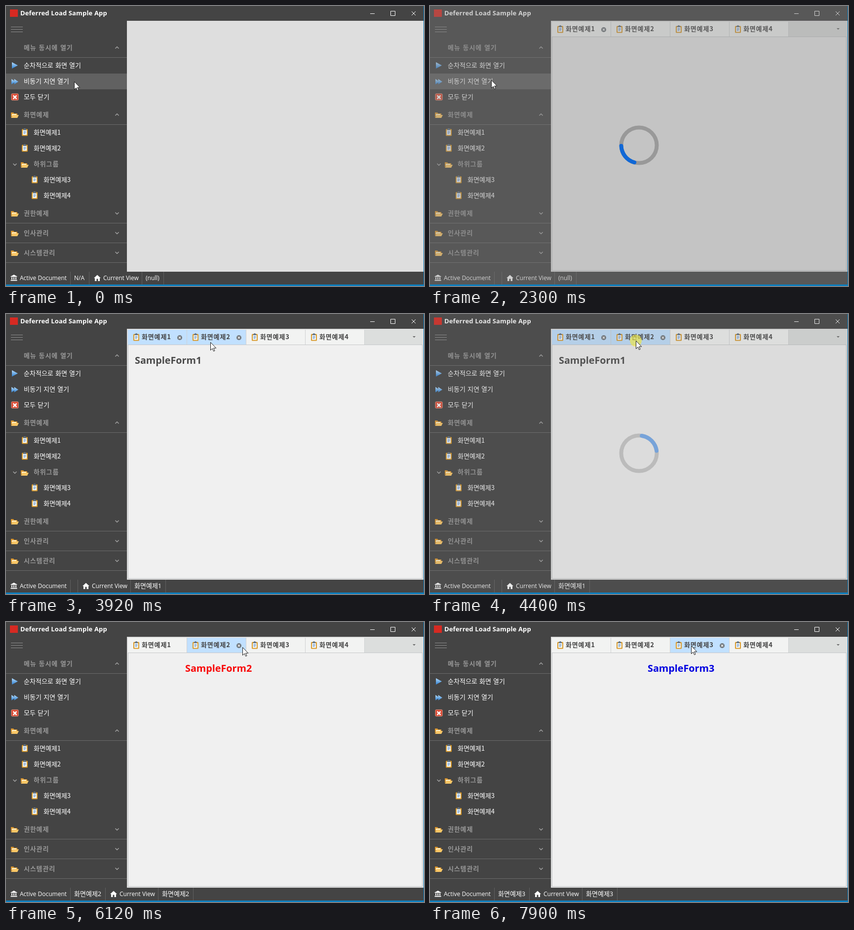
These frames come from a looping animation (847x568 px, 8000 ms). An HTML page:

```html
<!DOCTYPE html>
<html lang="ko">
<head>
<meta charset="utf-8">
<title>Deferred Load Sample App</title>
<style>
  html, body { margin: 0; width: 100%; height: 100%; overflow: hidden; background: #444; }
  svg { display: block; }
  text { font: 13px "Noto Sans CJK KR", "Noto Sans CJK", sans-serif; fill: #fff; word-spacing: .5px; white-space: pre; }
  .group { font-weight: 700; fill: #979797; letter-spacing: .85px; }
  .tab { font-weight: 700; fill: #444; letter-spacing: .85px; }
  .title { font: 700 13px "Noto Sans", sans-serif; letter-spacing: .15px; word-spacing: 0; }
  .status { font: 12px "Open Sans", "Noto Sans CJK KR", "Noto Sans CJK", sans-serif; word-spacing: 0; }
  .status.ko { font-size: 13px; }
  .form { font: 700 19.8px "Open Sans", sans-serif; word-spacing: 0; }
  .line { fill: none; stroke: #a8a8a8; stroke-width: 1.4; }
</style>
</head>
<body>
<svg id="app" width="847" height="568" viewBox="0 0 847 568">
  <defs>
    <linearGradient id="blue" x2="0" y2="1">
      <stop stop-color="#b5dcfb"/><stop offset="1" stop-color="#2f7fd0"/>
    </linearGradient>
    <g id="folder">
      <path d="M0 2h5l1.500 2H13v3H3L0 13z" fill="#d9962f"/>
      <path d="M2 5h9v4H2z" fill="#fff3d0"/>
      <path d="M3.500 7H16l-3 6H.5z" fill="#fbc766"/>
    </g>
    <g id="clip">
      <rect x="1" y="1.500" width="12" height="14" rx="1.500" fill="#d99a2b"/>
      <path d="M3 4h8v9.500H3z" fill="#f4f9ff"/>
      <path d="M4.500 6.500h5M4.500 8.500h5M4.500 10.500h4" stroke="#5688c4"/>
      <path d="M4 1.500h1.500L6 0h2l.5 1.500H10V4H4z" fill="#5f7389"/>
    </g>
    <path id="play" d="M0 0L12 6.500L0 13z" fill="url(#blue)"/>
    <g id="cross">
      <circle r="5" fill="#70767c"/>
      <path d="M-2-2L2 2M2-2L-2 2" stroke="#eee" stroke-width="1.500"/>
    </g>
  </defs>
  <rect width="847" height="568" fill="#444"/>
  <rect id="hover" width="245" height="32" fill="#616161"/>
  <g id="chrome"></g>
  <g id="side"></g>
  <rect x="245" y="30" width="601" height="509" fill="#dedede"/>
  <g id="docs">
    <rect x="247" y="32" width="597" height="31" fill="#dcdedd"/>
    <rect id="page" x="247.500" y="62.500" width="596" height="474" stroke="#c6c8ca"/>
    <g id="tabs"></g>
    <path d="M824 45h6l-3 3z" fill="#666"/>
    <text id="form" class="form" y="101"></text>
  </g>
  <g id="status"></g>
  <rect id="shade" width="846" height="565" fill="#7c7c7c"/>
  <g id="ring" fill="none" stroke-width="8">
    <circle cx="423.500" cy="282.500" r="36" stroke="#979797"/>
    <path id="arc" stroke="#0864d7" stroke-linecap="round"/>
  </g>
  <path d="M846 0h1v568H0v-3h846z" fill="#0d7fbf"/>
  <circle id="press" r="12" fill="#f0e63c" fill-opacity=".62"/>
  <path id="mouse" d="M.5.5V16.500L4.200 13L6.700 18.500L9 17.500L6.600 12.200H11.700z" fill="#fff" stroke="#1c1c1c"/>
</svg>
<script>
const LOOP = 8000, STEP = 75;
const $ = id => document.getElementById(id);
const clamp = v => Math.min(1, Math.max(0, v));
const text = (x, y, s, cls = '') => `<text x="${x}" y="${y}" class="${cls}">${s}</text>`;
const use = (id, x, y) => `<use href="#${id}" x="${x}" y="${y}"/>`;
const rule = y => `<path d="M0 ${y}.5H245" stroke="#6a6a6a"/>`;
const chevron = (x, y, d) => `<path class="line" d="M${x - 3.5} ${y - d * 1.75}l3.5 ${d * 3.5}l3.5 ${-d * 3.5}"/>`;
const docName = n => '화면예제' + n;

// Pointer moves: begin, end, destination
const REST = [138, 153];
const MOVES = [
  [659, 660, 124, 150], [2860, 3210, 184, 138], [3210, 3690, 356, 82], [3690, 3920, 414, 57],
  [4000, 4080, 417, 54], [4400, 5420, 426, 54], [5500, 5580, 431, 53], [5740, 6510, 529, 48]
];

// Each load: click, start of the fade-out
const LOADS = [[1290, 2300], [4400, 5340], [6830, 7670]];

const STATES = [
  { at: 0, tab: 0, form: 0, doc: 'N/A', view: '(null)' },
  { at: 2140, tab: 1, form: 0, doc: '', view: '(null)' },
  { at: 2360, tab: 1, form: 1, doc: '', view: docName(1) },
  { at: 5260, tab: 2, form: 2, doc: docName(2), view: docName(2) },
  { at: 7670, tab: 3, form: 3, doc: docName(3), view: docName(3) }
];
const FORMS = [[0, ''], [261, '#4b4b4b'], [363, '#f80808'], [441, '#0000e0']];

function pointer(t) {
  let [x, y] = REST;
  for (const [a, b, tx, ty] of MOVES) {
    const k = clamp((t - a) / (b - a));
    x += (tx - x) * k;
    y += (ty - y) * k;
  }
  return [Math.round(x), Math.round(y)];
}

// The overlay fades in coarse steps
function strength(t, [begin, end]) {
  const since = at => Math.floor((t - at) / STEP);
  return t < end ? clamp(.47 * (since(begin) + 1)) : clamp(.95 - .47 * since(end));
}

function buildFrame() {
  $('chrome').innerHTML =
    '<rect x="8" y="7" width="16" height="15" fill="#d62a22"/>' +
    text(29, 19, 'Deferred Load Sample App', 'title') +
    '<path d="M738 15.500h9M779.500 10.500h9v9h-9zM822 11l8 8M830 11l-8 8" fill="none" stroke="#fff"/>' +
    '<path d="M10 42.500h24M10 47.500h24M10 52.500h24" stroke="#8e8e8e"/>';

  const group = (y, s, dir) => use('folder', 10, y - 6) + text(36, y + 5, s, 'group') +
    chevron(225, y + .5, dir) + rule(y + 20);
  const item = (x, y, n) => use('clip', x, y - 8) + text(x + 25, y + 5, docName(n));

  $('side').innerHTML =
    text(36, 89, '메뉴 동시에 열기', 'group') + chevron(225, 84.5, -1) + rule(104) +
    use('play', 12, 114) + text(36, 125, '순차적으로 화면 열기') +
    '<g transform="translate(11 148) scale(.7 .85)">' + use('play', 0, 0) + use('play', 8, 0) + '</g>' +
    text(36, 157, '비동기 지연 열기') +
    '<rect x="11" y="178" width="14" height="13" rx="1.500" fill="#d8452f" stroke="#e79a84"/>' +
    '<path d="M14.500 181.500l7 7M21.500 181.500l-7 7" stroke="#fff" stroke-width="2.600"/>' +
    text(36, 189, '모두 닫기') +
    group(220, '화면예제', -1) + item(31, 256, 1) + item(31, 288, 2) +
    chevron(18, 321.5, 1) + use('folder', 30, 315) + text(56, 325, '하위그룹', 'group') +
    item(51, 352, 3) + item(51, 384, 4) +
    ['권한예제', '인사관리', '시스템관리'].map((s, i) => group(420 + 40 * i, s, 1)).join('');
}

function drawTabs(open, hot, ready) {
  let s = '';
  for (let n = 1; n <= 4; n++) {
    const x = 127 + 120 * n, lit = n === hot || (n === open && ready);
    s += `<rect x="${x}" y="32" width="120" height="30" fill="${lit ? '#c1e0ff' : '#f2f3f2'}"/>` +
      `<path d="M${x + 119.5} 32v30" stroke="#cfd1d2"/>` +
      use('clip', x + 10, 39) + text(x + 28, 51, docName(n), 'tab');
    if (n === open || n === hot) s += use('cross', x + 105, 48);
  }
  return s;
}

function drawStatus(doc, view) {
  const x = doc ? (doc === 'N/A' ? 168 : 201) : 145;
  const end = x + (view === '(null)' ? 151 : 178);
  const label = (lx, s) => text(lx, 556, s, /[가-힣]/.test(s) ? 'status ko' : 'status');
  const seps = [130, x, x + 107, end].map(v => `M${v}.5 539v26`).join('');
  return `<path d="${seps}" stroke="#606060"/>` +
    '<path d="M16 545l6.500 3.500v1h-13v-1zM11 550.500h2v4h-2zM15 550.500h2v4h-2zM19 550.500h2v4h-2zM9.500 555.500h13v2h-13z" fill="#fff"/>' +
    `<path transform="translate(${x + 10} 545)" d="M7 .5L14 7h-2v6H8.500V8.500h-3V13H2V7H0z" fill="#fff"/>` +
    label(28, 'Active Document') + label(138, doc) + label(x + 29, 'Current View') + label(x + 115, view);
}

function arcPath(deg) {
  const at = d => {
    const a = d * Math.PI / 180;
    return `${423.5 + 36 * Math.cos(a)} ${282.5 + 36 * Math.sin(a)}`;
  };
  return `M${at(deg)}A36 36 0 0 1 ${at(deg + 73)}`;
}

const cache = {};
function fill(id, html) {
  if (cache[id] !== html) $(id).innerHTML = cache[id] = html;
}
const show = (id, on) => $(id).style.display = on ? '' : 'none';

function render(t) {
  const { tab, form, doc, view } = STATES.findLast(s => s.at <= t);
  const load = LOADS.findLast(l => l[0] <= t);
  const busy = load ? strength(t, load) : 0;
  const [x, y] = pointer(t);

  for (const id of ['mouse', 'press']) $(id).setAttribute('transform', `translate(${x} ${y})`);
  show('press', load && t - load[0] < 100);

  const row = Math.floor((y - 105) / 32);
  show('hover', x < 245 && row >= 0 && row < 3);
  $('hover').setAttribute('y', 105 + 32 * row);

  show('docs', tab);
  $('page').setAttribute('fill', form ? '#f0f0f0' : '#ebebeb');
  const hot = x >= 247 && y >= 32 && y < 62 ? Math.floor((x - 127) / 120) : 0;
  fill('tabs', drawTabs(tab, hot, form > 0));
  $('form').textContent = form ? 'SampleForm' + form : '';
  $('form').setAttribute('x', FORMS[form][0]);
  $('form').style.fill = FORMS[form][1];
  fill('status', drawStatus(doc, view));

  $('shade').style.opacity = busy * .37;
  $('ring').style.opacity = busy;
  if (busy) $('arc').setAttribute('d', arcPath(-81 + Math.floor((t - load[0]) / STEP) * 42));
}

buildFrame();
const start = performance.now();
function loop() {
  render((performance.now() - start) % LOOP);
  requestAnimationFrame(loop);
}
loop();
</script>
</body>
</html>
```
